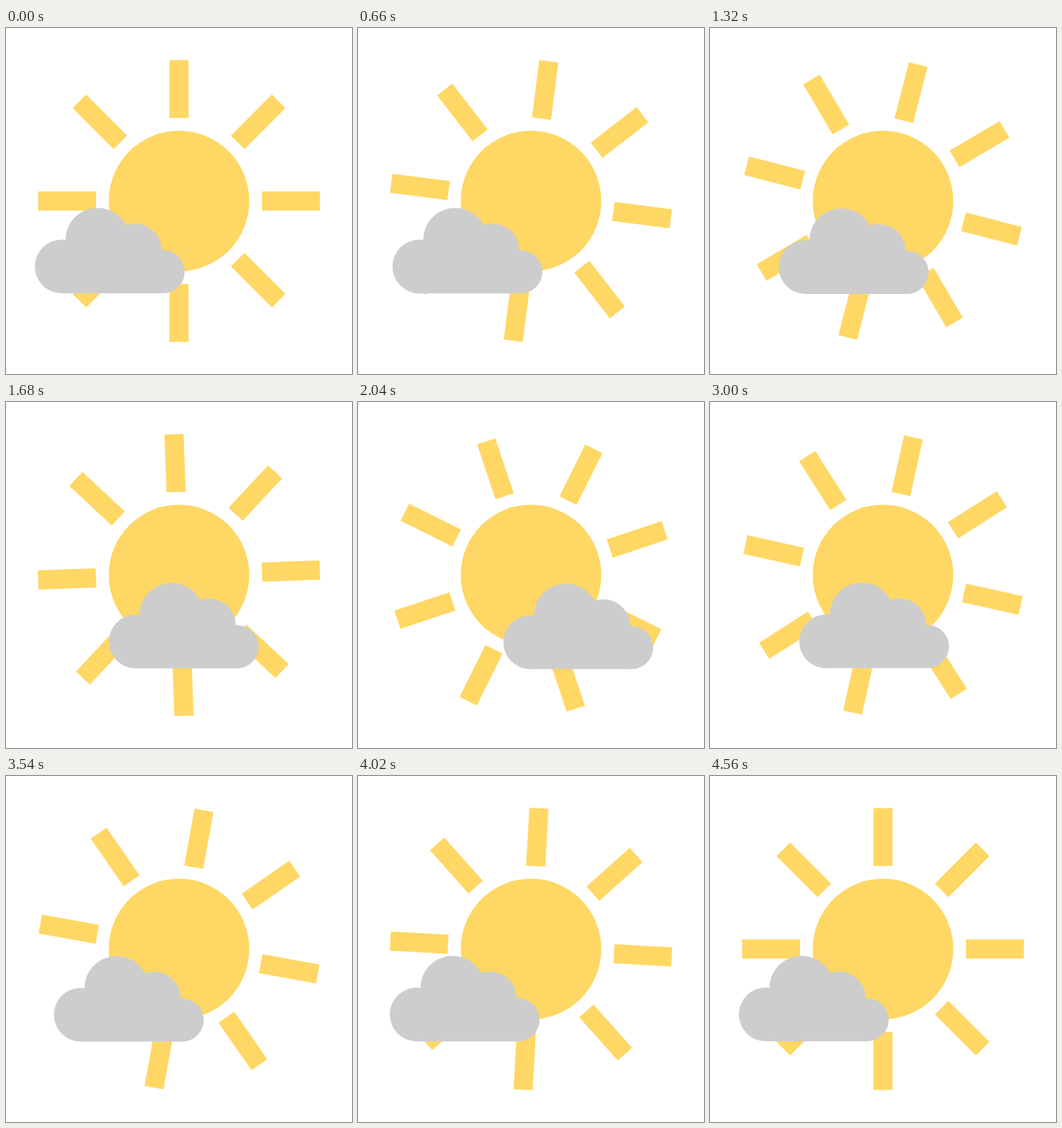
Write an HTML page that moves like this. It is 480 px wide and 480 px high and loops after 4620 ms.

```html
<!DOCTYPE html>
<html lang="en">
<head>
<meta charset="utf-8">
<title>Sun and cloud</title>
<style>
  html, body { margin: 0; width: 100%; height: 100%; overflow: hidden; background: #fff; }
  svg { display: block; width: 100%; height: 100%; }
  .sun { fill: #ffd764; }
  .cloud { fill: #cdcdcd; }
</style>
</head>
<body>
<svg viewBox="0 0 480 480">
  <g class="sun">
    <circle cx="240" cy="240" r="97.5"/>
    <g id="rays"></g>
  </g>
  <g id="cloud" class="cloud">
    <circle cx="77.3" cy="330.8" r="37.3"/>
    <circle cx="127" cy="294" r="44.5"/>
    <circle cx="179" cy="308.2" r="37"/>
    <circle cx="218" cy="338.2" r="29.9"/>
    <path d="M77 368.1V331L127 294L179 308L218 338V368.1Z"/>
  </g>
</svg>
<script>
  const LOOP = 4620;
  const STEP = 60;
  const TURN_STEPS = 75.8;
  const DRIFT = { x: 203, y: 3 };

  const rays = document.getElementById('rays');
  const cloud = document.getElementById('cloud');

  for (let i = 0; i < 8; i++) {
    const ray = document.createElementNS(rays.namespaceURI, 'rect');
    const attrs = { x: 226.7, y: 44.5, width: 26.6, height: 80.3, transform: `rotate(${i * 45} 240 240)` };
    for (const key in attrs) ray.setAttribute(key, attrs[key]);
    rays.append(ray);
  }

  // Slow start, fastest at the turning point.
  const ease = u => u - Math.sin(Math.PI * u) / Math.PI;

  function draw(time) {
    const step = Math.floor((time % LOOP) / STEP);
    const p = Math.min(1, step / TURN_STEPS);
    const d = ease(1 - Math.abs(1 - 2 * p));
    rays.setAttribute('transform', `rotate(${360 * p} 240 240)`);
    cloud.setAttribute('transform', `translate(${DRIFT.x * d} ${DRIFT.y * d})`);
  }

  const start = performance.now();
  function tick() {
    draw(performance.now() - start);
    requestAnimationFrame(tick);
  }
  tick();
</script>
</body>
</html>
```
